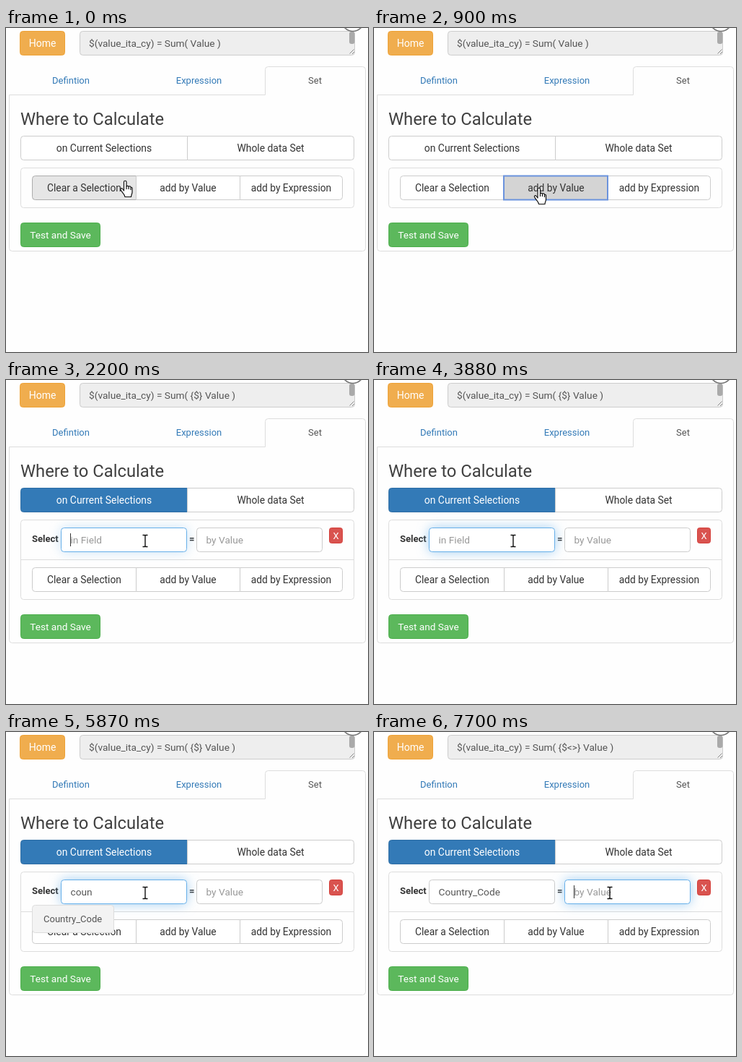
An HTML page that plays this animation: 502x448 px, repeating every 8 s.

```html
<!DOCTYPE html>
<html lang="en">
<head>
<meta charset="utf-8">
<title>Set editor</title>
<style>
  html, body { margin: 0; width: 502px; height: 448px; overflow: hidden; background: #fefefe; }
  svg { display: block; font-family: Roboto, "Open Sans", sans-serif; }
</style>
</head>
<body>
<svg id="stage" width="502" height="448" viewBox="0 0 502 448"></svg>
<script>
const LOOP = 8000;
const stage = document.getElementById('stage');

// Each track holds [start time, ...values]; the latest started entry applies.
const cursorTrack = [
  [0, 'hand', 165, 211], [120, 'hand', 172, 216], [240, 'hand', 180, 221],
  [380, 'hand', 214, 221], [500, 'hand', 228.5, 221],
  [1030, 'beam', 228, 222], [1280, 'beam', 219, 222], [1400, 'beam', 203, 222], [1520, 'beam', 193, 222],
  [6270, 'hand', 127, 246], [6400, 'hand', 91.5, 255],
  [6820, 'arrow', 91, 255], [7080, 'arrow', 150, 246], [7200, 'beam', 225, 234],
  [7320, 'beam', 290, 225], [7440, 'beam', 327, 222]
];
const fieldTrack = [[0, ''], [4410, 'c'], [4540, 'co'], [4690, 'cou'], [5090, 'coun'], [6820, 'Country_Code']];
const caretTrack = [
  [0, 0], [2200, 90], [2830, 0], [3350, 90], [3880, 0], [4410, 97.5], [4540, 105], [4690, 113],
  [5090, 120.5], [5870, 0], [6400, 120.5], [6670, 0], [7580, 278]
];
const fieldGlowTrack = [[0, 0], [2200, .35], [2330, .6], [6670, .12], [6820, 0]];
const valueGlowTrack = [[0, 0], [7580, .35], [7700, .6]];
const formulaTrack = [[0, ''], [1030, '{$} '], [6670, '{$&lt;&gt;} ']];

const at = (track, t) => track.filter(k => k[0] <= t).pop().slice(1);

function text(x, y, str, { size = 13.8, fill = '#333', anchor = 'start', weight = 400 } = {}) {
  return `<text x="${x}" y="${y}" font-size="${size}" fill="${fill}" text-anchor="${anchor}" font-weight="${weight}">${str}</text>`;
}

// Bordered box given by its outer edges, with separate left and right corner radii.
function box(x1, y1, x2, y2, fill, stroke, l = 4, r = 4, extra = '') {
  const [a, b, c, d] = [x1 + .5, y1 + .5, x2 - .5, y2 - .5];
  return `<path d="M${a + l} ${b}H${c - r}q${r} 0 ${r} ${r}V${d - r}q0 ${r} ${-r} ${r}H${a + l}q${-l} 0 ${-l} ${-l}V${b + l}q0 ${-l} ${l} ${-l}z"
    fill="${fill}" stroke="${stroke}" ${extra}/>`;
}

function button(x1, y, x2, label, look, l = 4, r = 4, size) {
  const [fill, stroke, ink] = look;
  return box(x1, y, x2, y + 34, fill, stroke, l, r) +
    text((x1 + x2) / 2, y + 22, label, { fill: ink, anchor: 'middle', size });
}

const plain = ['#fff', '#ccc', '#333'];
const hover = ['#e6e6e6', '#adadad', '#333'];
const pressed = ['#d4d4d4', '#8c8c8c', '#333'];
const focused = ['#ebebeb', '#8c8c8c', '#333'];
const primary = ['#337ab7', '#2e6da4', '#fff'];
const warning = ['#f0ad4e', '#eea236', '#fff'];
const success = ['#5cb85c', '#4cae4c', '#fff'];

function input(x, value, hint, glow) {
  const shade = glow ? `style="filter:drop-shadow(0 0 8px rgba(102,175,233,${glow}))"` : '';
  return box(x, 204, x + 175, 238, '#fff', glow ? '#66afe9' : '#ccc', 4, 4, shade) +
    text(x + 13.5, 226, value || hint, { fill: value ? '#555' : '#999', size: 13.7 });
}

function cursor(kind, x, y) {
  const shapes = {
    hand: `<path d="M-1.5 12.5V2a1.75 1.75 0 0 1 3.5 0V8a1.7 1.7 0 0 1 3 .6a1.6 1.6 0 0 1 3 .8a1.4 1.4 0 0 1 2 1.4V16
      c0 2.5-1.5 3.5-1.5 6.5H0C0 19-4 17-6 12.5c-.6-1.8 1.5-2.6 2.6-1L-1.5 14z" fill="#fff"/><path d="M2 8v4M5 9v3M8 10v3" fill="none"/>`,
    beam: '<path d="M-3.5-7.5H-1L0-7L1-7.5H3.5M0-7V8M-3.5 8.5H-1L0 8L1 8.5H3.5" fill="none" stroke-width="1.4"/>',
    arrow: '<path d="M.5 .5V16.5L4.2 13L6.8 18.5L9 17.5L6.6 12.2H11.7z" fill="#fff"/>'
  };
  return `<g transform="translate(${x} ${y})" stroke="#111" stroke-width="1.2" stroke-linejoin="round">${shapes[kind]}</g>`;
}

function header(formula) {
  return button(19, 4, 82, 'Home', warning, 4, 4, 14) +
    box(102, 4, 484, 38, '#eee', '#ccc') +
    text(115, 26, `$(value_ita_cy) = Sum( ${formula}Value )`, { fill: '#555', size: 13.7 }) +
    '<rect x="476" y="5" width="7.5" height="17" rx="3" fill="#aaa"/>' +
    '<path d="M476.5 35.5L482.5 29.5M480 36L483 33" stroke="#888"/>' +
    '<circle cx="481" cy="-11" r="15.5" fill="#fff" fill-opacity=".7" stroke="#777" stroke-width="1.6"/>';
}

function tabs(bottom) {
  const tab = (x, label, fill) => text(x, 77, label, { size: 13, fill, anchor: 'middle' });
  return `<path d="M4.5 92.5H359.5V57.5q0-4 4-4H494.5q4 0 4 4V${bottom - 4}q0 4-4 4H8.5q-4 0-4-4z" fill="#fefefe" stroke="#ddd"/>` +
    tab(90, 'Defintion', '#337ab7') + tab(267.5, 'Expression', '#337ab7') + tab(428.5, 'Set', '#555');
}

function filterRow(t) {
  const [field] = at(fieldTrack, t);
  const [caret] = at(caretTrack, t);
  return '<path d="M21 248.5H483" stroke="#ddd"/>' +
    text(36, 224, 'Select', { size: 13, weight: 700 }) +
    text(254, 224, '=', { size: 13, weight: 700 }) +
    input(76, field, 'in Field', at(fieldGlowTrack, t)[0]) +
    input(264, '', 'by Value', at(valueGlowTrack, t)[0]) +
    box(448, 204, 467, 226, '#d9534f', '#d43f3a', 3, 3) +
    text(457.5, 220, 'X', { fill: '#fff', anchor: 'middle', size: 13 }) +
    (caret ? `<path d="M${Math.floor(caret) - .5} 212V230" stroke="#333"/>` : '');
}

function view(t) {
  const added = t >= 1030;
  const shift = added ? 55 : 0;
  const row = 204 + shift;
  const clearLook = t < 380 ? hover : plain;
  const valueLook = t < 380 || t >= 2200 ? plain : t < 900 ? hover : added ? focused : pressed;
  const ringed = t >= 900 && t < 2200;
  const menuOpen = t >= 5340 && t < 6820;

  return header(at(formulaTrack, t)[0]) +
    tabs(308.5 + shift) +
    text(20, 134, 'Where to Calculate', { size: 23.8, fill: '#404040' }) +
    button(20, 149, 252, 'on Current Selections', added ? primary : plain, 4, 0, 13.9) +
    button(251, 149, 483, 'Whole data Set', plain, 0, 4, 13.9) +
    box(20, 193, 483, 249 + shift, '#fefefe', '#ddd') +
    (added ? filterRow(t) : '') +
    button(324, row, 467, 'add by Expression', plain, 0, 4) +
    button(36, row, 181, 'Clear a Selection', clearLook, 4, 0) +
    button(180, row, 325, 'add by Value', valueLook, 0, 0) +
    (ringed ? `<rect x="180" y="${row + .5}" width="144" height="33" fill="none" stroke="#6b93dd" stroke-width="2"/>` : '') +
    button(20, 269 + shift, 131, 'Test and Save', success, 4, 4, 13.6) +
    (menuOpen ? box(36, 239, 150, 278, '#f3f3f3', '#ddd') + text(52, 263, 'Country_Code', { size: 13, fill: '#555' }) : '') +
    cursor(...at(cursorTrack, t));
}

let shown = '';
function draw() {
  const next = view(performance.now() % LOOP);
  if (next !== shown) stage.innerHTML = shown = next;
  requestAnimationFrame(draw);
}
draw();
</script>
</body>
</html>
```
